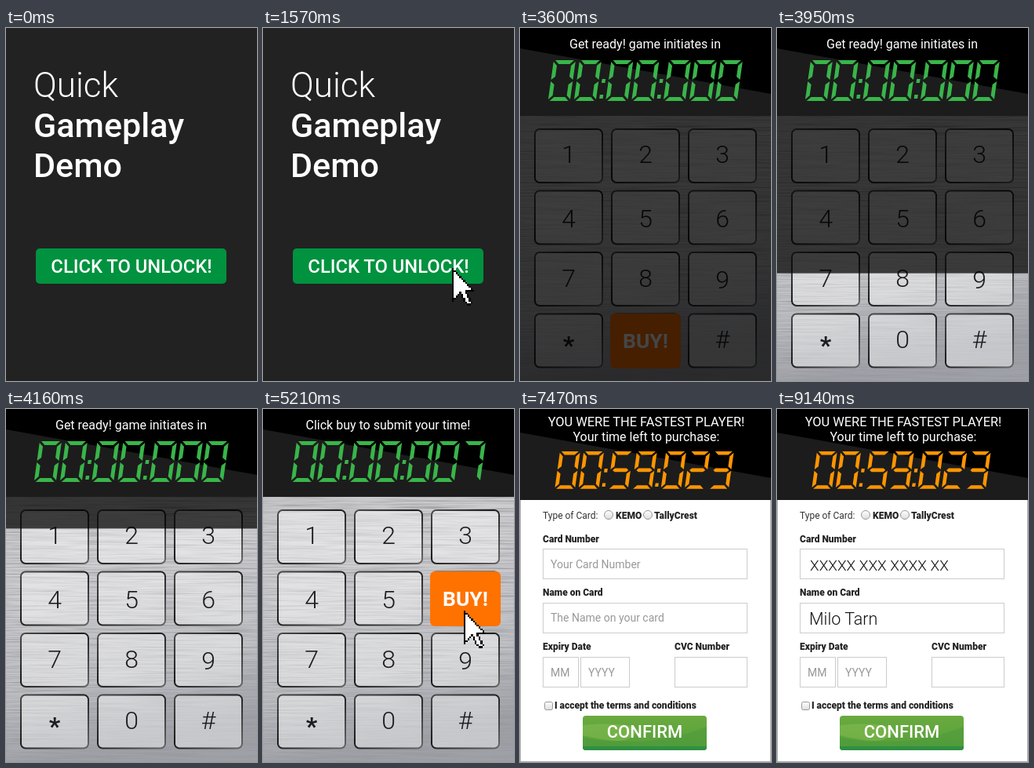
Write an HTML page that moves like this. It is 320x450 px and loops after 9.77 s.

```html
<!DOCTYPE html>
<html lang="en">
<head>
<meta charset="utf-8">
<title>Quick gameplay demo</title>
<style>
html, body { margin: 0; width: 100%; height: 100%; overflow: hidden; background: #222; }
svg { display: block; width: 100%; height: 100%; }
text { font-family: Roboto, sans-serif; white-space: pre; }
.mid { text-anchor: middle; }
.head { font-size: 16px; fill: #fff; text-anchor: middle; }
.label { font-size: 12px; font-weight: 900; fill: #222; }
.hint { font-size: 14px; fill: #999; }
.typed { font-weight: 300; fill: #111; }
.box { fill: #fff; stroke: #ccc; }
.key { fill: #fff; fill-opacity: .42; stroke: url(#edge); stroke-width: 2; }
.num { font-size: 32px; font-weight: 300; fill: #1c1c1e; text-anchor: middle; }
</style>
</head>
<body>
<svg id="stage" viewBox="0 0 320 450">
  <defs>
    <linearGradient id="metal" x2="0.15" y2="1">
      <stop offset="0" stop-color="#bcbdc0"/>
      <stop offset=".45" stop-color="#cfcfd2"/>
      <stop offset=".8" stop-color="#bfc0c4"/>
      <stop offset="1" stop-color="#9fa1a8"/>
    </linearGradient>
    <linearGradient id="edge" x2="1" y2="1">
      <stop offset="0" stop-color="#4a4a4a"/>
      <stop offset=".45" stop-color="#1c1c1c"/>
      <stop offset="1" stop-color="#666"/>
    </linearGradient>
    <linearGradient id="green" x2="0" y2="1">
      <stop offset="0" stop-color="#6aaa3f"/>
      <stop offset="1" stop-color="#569f3c"/>
    </linearGradient>
    <linearGradient id="knob" x2="0" y2="1">
      <stop offset="0" stop-color="#fff"/>
      <stop offset="1" stop-color="#ddd"/>
    </linearGradient>
    <filter id="brush" x="0" y="0" width="1" height="1">
      <feTurbulence type="fractalNoise" baseFrequency=".012 .6" numOctaves="3" seed="4"/>
      <feColorMatrix values="0 0 0 0 .3  0 0 0 0 .3  0 0 0 0 .32  1.6 0 0 0 -.62"/>
    </filter>
    <clipPath id="btnClip"><rect x="80" y="391" width="158" height="44" rx="4"/></clipPath>
  </defs>

  <g id="intro">
    <rect width="320" height="450" fill="#222"/>
    <g fill="#fff" font-size="43">
      <text x="35" y="88" font-size="44" font-weight="300">Quick</text>
      <text x="35" y="139" font-weight="500">Gameplay</text>
      <text x="35" y="190" font-weight="500">Demo</text>
    </g>
    <rect id="unlock" x="38" y="281" width="243" height="45" rx="5"/>
    <text class="mid" x="160" y="312" font-size="23.8" font-weight="500" fill="#fff">CLICK TO UNLOCK!</text>
  </g>

  <g id="pad">
    <rect width="320" height="450" fill="url(#metal)"/>
    <rect width="320" height="450" filter="url(#brush)"/>
    <g id="keys"></g>
    <g id="buy">
      <rect width="90" height="70" rx="6" fill="#ff7200"/>
      <text class="mid" x="45" y="44" font-size="26.5" font-weight="700" fill="#fff">BUY!</text>
    </g>
    <rect id="shade" y="112" width="320" fill="#000" opacity=".73"/>
  </g>

  <g id="page">
    <rect x=".5" y=".5" width="319" height="449" fill="#fff" stroke="#aaa"/>
    <g id="form">
      <text x="29" y="140" font-size="12" fill="#333">Type of Card:</text>
      <g fill="url(#knob)" stroke="#999">
        <circle cx="113" cy="135" r="5.5"/>
        <circle cx="163" cy="135" r="5.5"/>
        <rect x="31.5" y="373.5" width="10" height="10" rx="2"/>
      </g>
      <g class="label">
        <text x="122" y="140">KEMO</text>
        <text x="171" y="140">TallyCrest</text>
        <text x="29" y="170">Card Number</text>
        <text x="29" y="238">Name on Card</text>
        <text x="29" y="307">Expiry Date</text>
        <text x="197" y="307">CVC Number</text>
        <text x="44" y="382">I accept the terms and conditions</text>
      </g>
      <g class="box">
        <rect x="29.5" y="178.5" width="260" height="38"/>
        <rect x="29.5" y="247.5" width="260" height="38"/>
        <rect x="29.5" y="316.5" width="45" height="38"/>
        <rect x="77.5" y="316.5" width="62" height="38"/>
        <rect x="197.5" y="316.5" width="92" height="38"/>
      </g>
      <g class="hint">
        <text id="cardHint" x="39" y="203">Your Card Number</text>
        <text id="nameHint" x="39" y="271">The Name on your card</text>
        <text x="39" y="341">MM</text>
        <text x="87" y="341">YYYY</text>
      </g>
      <g class="typed">
        <text id="card" x="42" y="206" font-size="19">XXXXX XXX XXXX XX</text>
        <text id="name" x="41" y="275" font-size="21.5">Milo Tarn</text>
      </g>
      <g clip-path="url(#btnClip)">
        <rect x="80" y="391" width="158" height="44" fill="url(#green)"/>
        <path d="M80 403Q140 398 150 410Q140 432 80 418Z" fill="#8cc152" opacity=".45"/>
        <path d="M80 416Q160 436 238 405V435H80Z" fill="#4a9a3a" opacity=".5"/>
        <rect x="80" y="430" width="158" height="5" fill="#2f8f42"/>
      </g>
      <text class="mid" x="159" y="419" font-size="22" font-weight="500" fill="#fff">CONFIRM</text>
    </g>
    <text id="win" class="mid" x="160" y="297" font-size="26" fill="#222">Winner!</text>
  </g>

  <g id="header">
    <rect id="band" width="320" fill="#000"/>
    <path id="slope" fill="#1c1c1c"/>
    <text id="line1" class="head"></text>
    <text id="line2" class="head" x="161" y="41">Your time left to purchase:</text>
    <path id="clock"/>
  </g>
  <g id="cursor" shape-rendering="crispEdges"></g>
</svg>
<script>
const LOOP = 9770, TICK = 30;
const el = {};
document.querySelectorAll('#stage [id]').forEach(n => el[n.id] = n);

const set = (node, attrs) => { for (const k in attrs) node.setAttribute(k, attrs[k]); };
const show = (node, on) => node.setAttribute('display', on ? 'inline' : 'none');
const add = (parent, tag, attrs, text = '') => {
  const n = document.createElementNS('http://www.w3.org/2000/svg', tag);
  set(n, attrs);
  n.textContent = text;
  parent.append(n);
};
const clamp = v => Math.min(1, Math.max(0, v));
const stepped = (t, start) => Math.floor((t - start) / TICK) * TICK;

// Keypad
const keyX = i => 19 + (i % 3) * 98;
const keyY = i => 129 + Math.floor(i / 3) * 78.5;
const BASE = [172, 254, 330, 408];
[...'123456789*0#'].forEach((ch, i) => {
  add(el.keys, 'rect', { class: 'key', x: keyX(i), y: keyY(i), width: 86, height: 68, rx: 6 });
  const star = ch === '*';
  const dy = star ? 7 : ch === '9' ? 2 : 0;
  add(el.keys, 'text', {
    class: 'num', x: keyX(i) + 43, y: BASE[Math.floor(i / 3)] + dy,
    'font-weight': 300, style: star ? 'font-weight:700' : ''
  }, ch);
});

// Pixel arrow, one row at a time
const run = (x, y, w, fill) => { if (w > 0) add(el.cursor, 'rect', { x, y, width: w, height: 1, fill }); };
for (let y = 0; y < 19; y++) {
  const w = y < 12 ? y + 1 : 17 - y;
  run(0, y, w, '#000');
  run(1, y, y === 11 ? 6 : w - 2, '#fff');
  if (y > 11 && y < 18) {
    const x = Math.floor((y - 3) / 2);
    run(x, y, 4, '#000');
    run(x + 1, y, 2, '#fff');
  }
}
run(8, 18, 2, '#000');

// Seven-segment clock
const SEG = {
  a: [2, 0, 26, 0, 21, 5, 7, 5],
  b: [28, 2, 28, 25, 23, 21, 23, 7],
  c: [28, 27, 28, 50, 23, 45, 23, 31],
  d: [2, 52, 26, 52, 21, 47, 7, 47],
  e: [0, 27, 0, 50, 5, 45, 5, 31],
  f: [0, 2, 0, 25, 5, 21, 5, 7],
  g: [3, 26, 6, 23.5, 22, 23.5, 25, 26, 22, 28.5, 6, 28.5]
};
const LIT = 'abcdef bc abged abgcd fgbc afgcd afgedc abc abcdefg abcdfg'.split(' ');
const DOTS = [[0, 24, 4.5, 24, 4.5, 29, 0, 29], [0, 44, 4.5, 44, 4.5, 49, 0, 49]];

function clockPath(text) {
  let x = 0, d = '';
  for (const ch of text) {
    const colon = ch === ':';
    const shapes = colon ? DOTS : [...LIT[+ch]].map(s => SEG[s]);
    for (const p of shapes) {
      d += 'M';
      for (let i = 0; i < p.length; i += 2) d += `${x + p[i] - (colon ? 1 : 0)} ${p[i + 1]} `;
      d += 'Z';
    }
    x += colon ? 7.5 : 33;
  }
  return d;
}
const pad = (n, len) => String(n).padStart(len, '0');
const clockText = ms => `00:${pad(Math.floor(ms / 1000), 2)}:${pad(ms % 1000, 3)}`;

// BUY hops over the keys while the clock runs down
const HOPS = [4, 8, 0, 11, 5, 2, 9, 6, 1, 7, 3, 0, 10];
function hopAt(t) {
  const i = t < 3330 ? Math.min(8, Math.floor((t - 2280) / 115))
                     : Math.min(12, 9 + Math.floor((t - 3330) / 90));
  return { key: HOPS[i], time: i < 9 ? 2280 + i * 115 : 3330 + (i - 9) * 90 };
}

function drawCursor(t) {
  let x, y, on = false;
  if (t >= 1060 && t < 2280) {
    const k = Math.min(24, stepped(t, 1060) / TICK);
    x = 322 - k * 4.76;
    y = 350 - k * 2.56;
    on = true;
  } else if (t >= 4460 && t < 5810) {
    const p = clamp(stepped(t, 4460) / 750);
    x = 325 - 69 * p;
    y = 378 - 121 * p;
    on = true;
  }
  show(el.cursor, on);
  if (on) set(el.cursor, { transform: `translate(${x} ${y}) scale(2.35 2.5)` });
}

function drawPad(t) {
  const hop = hopAt(t);
  const playing = t >= 4460;
  const key = playing ? 5 : hop.key;
  show(el.buy, t < 3770 || playing);
  set(el.buy, { transform: `translate(${keyX(key) - 2} ${keyY(key) - 0.5})` });
  const p = t < 3770 ? 0 : clamp(stepped(t, 3770) / 443);
  set(el.shade, { height: 338 * (1 - p) });
  return playing ? Math.min(7, Math.floor((t - 4460) / 100)) : 3600 - hop.time;
}

function drawHeader(t, ms) {
  const paged = t >= 5810, final = t >= 7470;
  const h = paged ? 116 : 112;
  set(el.band, { height: h });
  set(el.slope, { d: `M0 ${h - 86}L320 ${h - 28}V${h}H0Z` });
  el.line1.textContent = final ? 'YOU WERE THE FASTEST PLAYER!'
    : paged ? '' : t < 4460 ? 'Get ready! game initiates in' : 'Click buy to submit your time!';
  set(el.line1, { x: final ? 161 : 159.5, y: final ? 22 : 26, style: final ? 'font-size:16.4px' : '' });
  show(el.line2, final);
  set(el.clock, {
    d: clockPath(clockText(ms)),
    fill: final ? '#ff9500' : '#39b54a',
    transform: final ? 'translate(51 54) scale(.92) skewX(-8)' : 'translate(43 41) skewX(-8)'
  });
}

function draw(t) {
  const intro = t < 2280, paged = t >= 5810, final = t >= 7470;
  show(el.intro, intro);
  show(el.pad, !intro && !paged);
  show(el.page, paged);
  show(el.header, !intro);
  set(el.unlock, { fill: t >= 1850 ? '#007a33' : '#00923f' });

  let ms = final ? 59023 : 7;
  if (!intro && !paged) ms = drawPad(t);
  if (!intro) drawHeader(t, ms);

  show(el.form, final);
  show(el.win, t >= 6140 && !final);
  show(el.cardHint, t < 8140);
  show(el.card, t >= 8140);
  show(el.nameHint, t < 9140);
  show(el.name, t >= 9140);
  drawCursor(t);
}

const start = performance.now();
function frame() {
  draw((performance.now() - start) % LOOP);
  requestAnimationFrame(frame);
}
frame();
</script>
</body>
</html>
```
